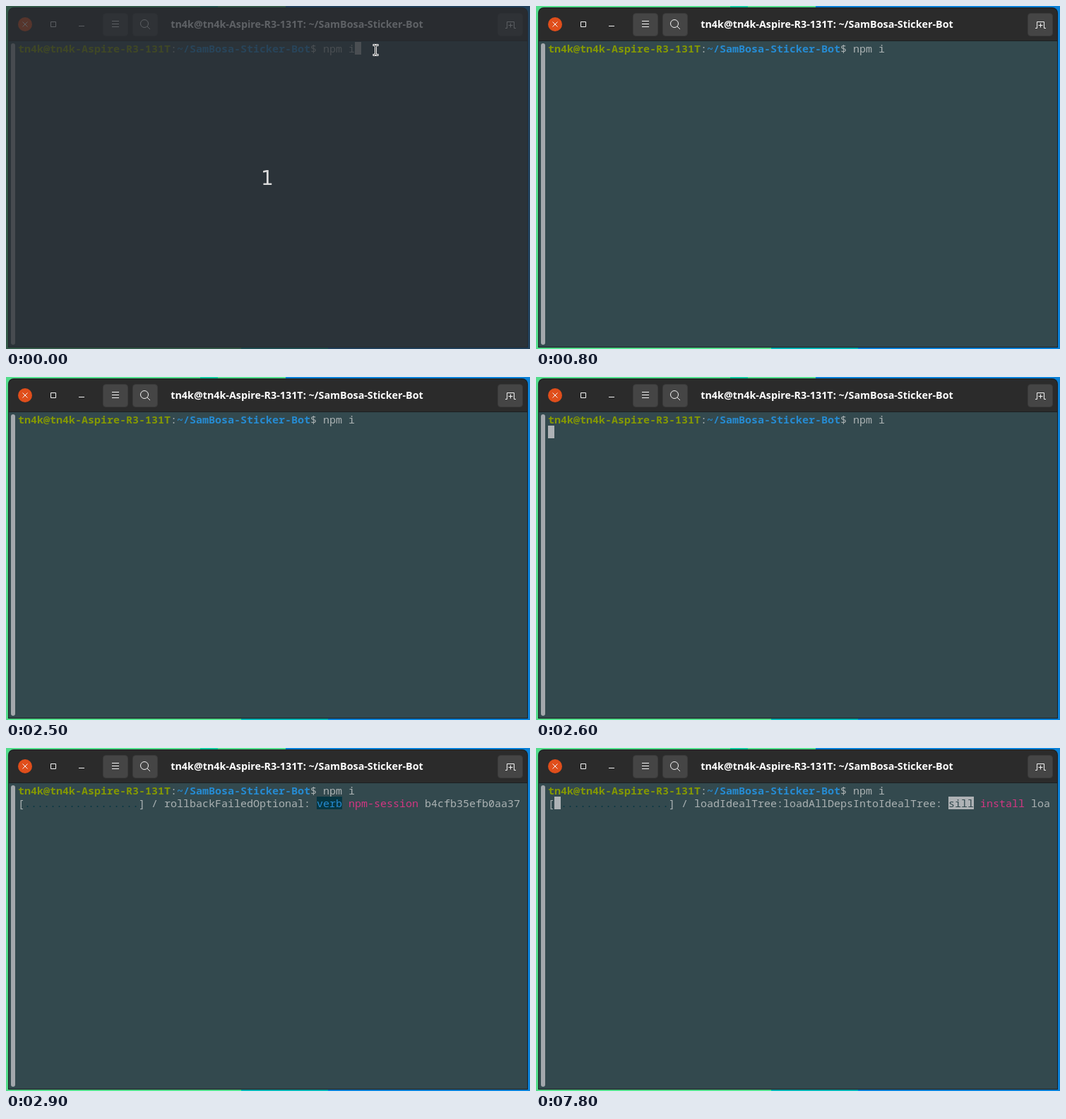
Animation of 742 by 487 pixels, one loop 8 s. Source, as an HTML page:

```html
<!DOCTYPE html>
<html lang="en">
<head>
<meta charset="utf-8">
<title>Terminal</title>
<style>
  html, body { margin: 0; width: 742px; height: 487px; overflow: hidden; }
  body { position: relative; background: #0a80d6; }
  svg { position: absolute; left: 0; top: 0; }
  .title { font: bold 14.3px "Noto Sans", sans-serif; fill: #fff; text-anchor: middle; }
  .count { font: 28px "DejaVu Sans", sans-serif; fill: #dcdcdc; text-anchor: middle; }
  .button { fill: #454545; stroke: #3a3a3a; }
  .icon { fill: none; stroke: #f2f2f2; }
  #screen { position: absolute; left: 17px; top: 51px; white-space: pre; color: #abb2b3;
    font: 15px/18px "Noto Sans Mono", monospace; }
  #screen div { height: 18px; }
  #screen span { display: inline-block; height: 18px; vertical-align: top; }
  .user { color: #859900; font-weight: bold; }
  .path { color: #268bd2; font-weight: bold; }
  .block { background: #aeb2b5; color: #33494e; }
  .dots { color: #073642; }
  .verb { background: #073642; color: #268bd2; }
  .info { color: #859900; }
  .topic { color: #d33682; }
</style>
</head>
<body>
<svg width="742" height="487">
  <path fill="#52dc8b" d="M0 0H396V10H0zM0 0H10V487H0zM0 477H333V487H0z"/>
  <path fill="#12c99b" d="M275 0H300V10H275z"/>
  <path fill="#06b3b4" d="M333 477H456V487H333z"/>
  <path fill="#1c2022" d="M3 485V10a8 8 0 0 1 8-8H731a8 8 0 0 1 8 8V485z"/>
  <path fill="#2b2b2b" d="M4 49V11a8 8 0 0 1 8-8H730a8 8 0 0 1 8 8V49z"/>
  <path fill="#33494e" d="M4 50H738V484H4z"/>
  <rect x="7" y="53" width="6" height="428" rx="3" fill="#a3a8ac"/>

  <circle cx="27" cy="26" r="10" fill="#e04e1b"/>
  <g class="button">
    <rect x="137.500" y="10.500" width="35" height="32" rx="4"/>
    <rect x="179.500" y="10.500" width="35" height="32" rx="4"/>
    <rect x="696.500" y="10.500" width="35" height="32" rx="4"/>
  </g>
  <g class="icon">
    <path d="M23.500 22.500l7 7m0-7l-7 7M63.500 22.500h7v7h-7zM103 28.500h8"/>
    <path d="M150 21.500h10m-10 4h10m-10 4h10"/>
    <circle cx="196" cy="25" r="5.500"/>
    <path d="M200 29l4 4"/>
    <path d="M707 31.500h2.500v-9h10v9h2.500M711.500 27.500h6m-3-3v6"/>
  </g>
  <text class="title" x="412" y="31">tn4k@tn4k-Aspire-R3-131T: ~/SamBosa-Sticker-Bot</text>
</svg>

<div id="screen"><div id="prompt"></div><div id="output"></div></div>

<svg id="countdown" width="742" height="487">
  <path fill="#282c32" fill-opacity=".75" d="M0 0H742V487H0z"/>
  <text class="count" x="370" y="254">1</text>
  <g fill="none" stroke-linecap="square">
    <path id="beam" stroke="#fff" stroke-width="3" d="M521 55.500h1.500l1 1 1-1h1.500M523.500 56.500v12M521 69.500h1.500l1-1 1 1h1.500"/>
    <path stroke="#222" d="M521 55.500h1.500l1 1 1-1h1.500M523.500 56.500v12M521 69.500h1.500l1-1 1 1h1.500"/>
  </g>
</svg>

<script>
const LOOP = 8000;
const $ = id => document.getElementById(id);
const span = (cls, text) => `<span class="${cls}">${text}</span>`;
const cursor = span('block', ' ');
const command = span('user', 'tn4k@tn4k-Aspire-R3-131T') + ':' +
  span('path', '~/SamBosa-Sticker-Bot') + '$ npm i';

// Progress line: 18-cell bar, spinner, stage, log level, topic, message
const progress = (done, spinner, stage, level, label, topic, rest) =>
  '[' + (done ? span('block', ' '.repeat(done)) : '') + span('dots', '.'.repeat(18 - done)) +
  `] ${spinner} ${stage}: ${span(level, label)} ${span('topic', topic)} ${rest}`;
const rollback = spinner => progress(0, spinner, 'rollbackFailedOptional',
  'verb', 'verb', 'npm-session', 'b4cfb35efb0aa37');

// [start time, second line]
const steps = [
  [0, ''],
  [500, cursor],
  [800, ''],
  [1400, cursor],
  [2500, ''],
  [2600, cursor],
  [2800, rollback('|')],
  [2900, rollback('/')],
  [3000, progress(1, '|', 'preinstall:coligans', 'info', 'info', 'lifecycle', 'coligans@0.0.1~prein')],
  [7800, progress(1, '/', 'loadIdealTree:loadAllDepsIntoIdealTree', 'block', 'sill', 'install', 'loa')],
];

let shown;
function draw() {
  const t = performance.now() % LOOP;
  $('countdown').style.display = t < 200 ? '' : 'none';
  const step = steps.findLast(([start]) => start <= t);
  if (step !== shown) {
    shown = step;
    $('prompt').innerHTML = command + (t < 500 ? cursor : '');
    $('output').innerHTML = step[1];
  }
  requestAnimationFrame(draw);
}
draw();
</script>
</body>
</html>
```
